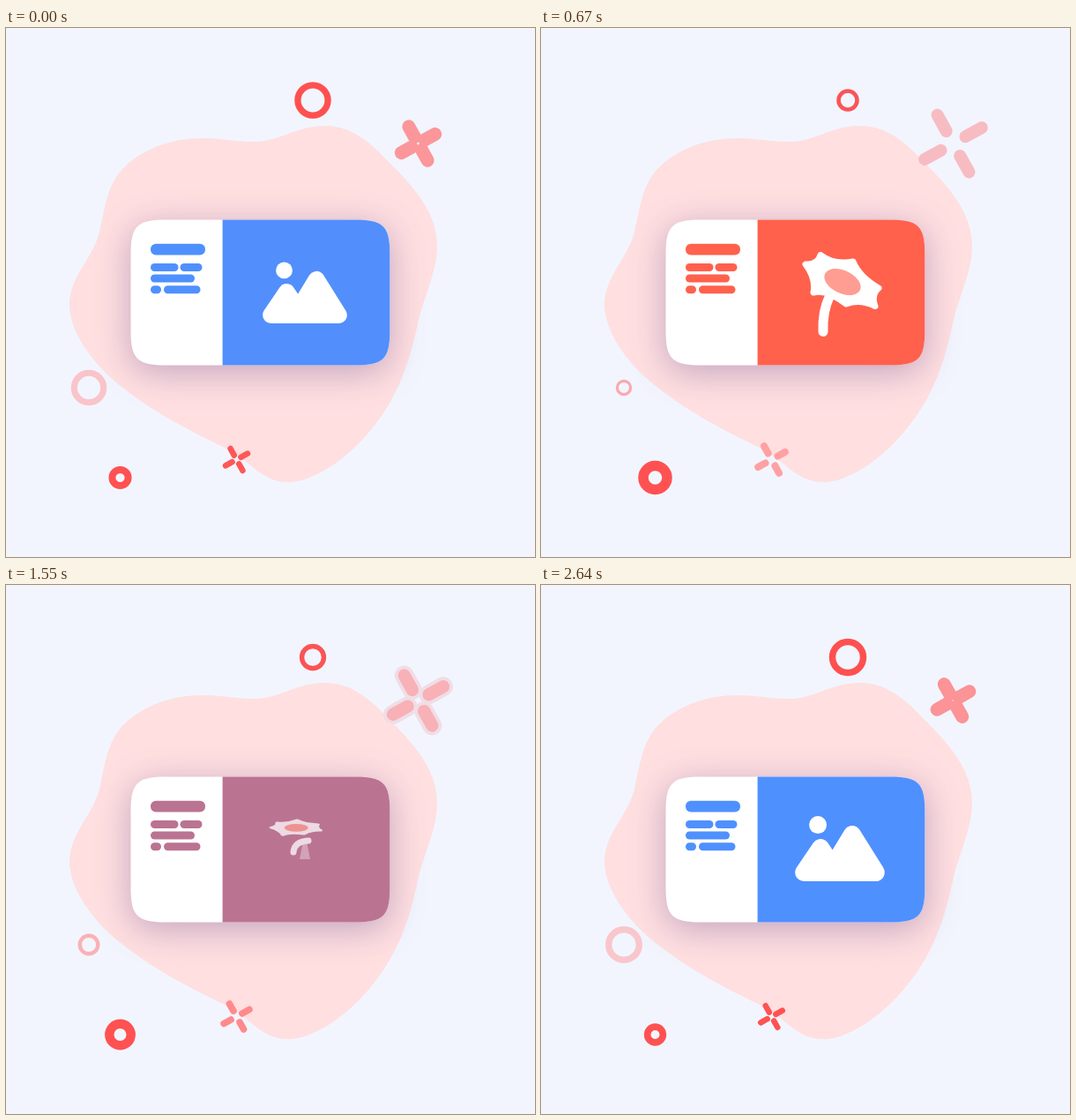
An HTML page for the animation above (2670 ms loop, 600 by 600 pixels).

```html
<!DOCTYPE html>
<html lang="en">
<head>
<meta charset="utf-8">
<title>Card morph</title>
<style>
html, body { margin: 0; width: 100%; height: 100%; overflow: hidden; background: #f2f5fd; }
svg { display: block; width: 100vw; height: 100vh; }
.shadow { filter: drop-shadow(0 8px 19px rgba(95, 70, 140, .38)); }
.round { stroke-linecap: round; stroke-linejoin: round; }
</style>
</head>
<body>
<svg viewBox="0 0 600 600">
  <defs>
    <clipPath id="clip"><use href="#cardShape"/></clipPath>
  </defs>
  <path fill="#ffdfe0" d="M360 111C390 110 412 128 434 152C466 183 489 212 489 247C489 278 473 305 466 340C455 390 440 425 412 458C388 487 350 515 320 515C290 515 278 492 250 477C205 455 165 435 125 402C95 377 72 342 72 314C72 282 98 262 106 232C112 205 114 180 132 160C155 136 190 125 222 125C245 125 260 129 282 129C310 129 330 111 360 111Z"/>

  <g class="shadow">
    <path id="cardShape" fill="#fff" d="M141.500 256C141.500 225 149 217.500 180 217.500H397C428 217.500 435.300 225 435.300 256V344C435.300 375 428 382.500 397 382.500H180C149 382.500 141.500 375 141.500 344Z"/>
  </g>
  <rect id="panel" x="245.600" y="216" width="191" height="168" clip-path="url(#clip)"/>

  <g id="text">
    <rect x="164" y="244.800" width="62" height="12.800" rx="6"/>
    <rect x="164" y="267" width="31.500" height="9" rx="4.500"/>
    <rect x="197.500" y="267" width="25" height="9" rx="4.500"/>
    <rect x="164" y="279.500" width="50" height="9" rx="4.500"/>
    <rect x="164" y="292.300" width="12" height="9" rx="4.500"/>
    <rect x="179" y="292.300" width="41.500" height="9" rx="4.500"/>
  </g>

  <g id="hills" class="round" fill="#fff">
    <circle cx="314" cy="272" r="10"/>
    <path stroke="#fff" stroke-width="20" d="M298 326L317 298L331 319L353 283L380 326Z"/>
  </g>

  <g id="flower" class="round">
    <path id="leaf" fill="#fff" d="M337 291H341L345 311H333Z"/>
    <path id="stem" fill="none" stroke="#fff"/>
    <g id="head">
      <path fill="#fff" stroke="#fff" stroke-width="7" d="M317 257.500Q332 269 354 265Q361 282 383 295Q374 303 379 315.500Q362 307 346 313Q324 296 309 300Q312 284 300 268Q314 269 317 257.500Z"/>
      <ellipse cx="342" cy="288" rx="22" ry="13" transform="rotate(25 342 288)" fill="#ff9d92"/>
    </g>
  </g>

  <g fill="none">
    <circle id="ringTop" cx="348" cy="82"/>
    <circle id="ringLeft" cx="94" cy="408"/>
    <circle id="ringLow" cx="129.500" cy="510"/>
    <g class="round">
      <path id="halo" stroke="#f1dce4" stroke-width="22"/>
      <path id="crossBig"/>
      <path id="crossSmall"/>
    </g>
  </g>
</svg>
<script>
const LOOP = 2670;
const $ = id => document.getElementById(id);
const set = (id, attrs) => {
  for (const k in attrs) $(id).setAttribute(k, attrs[k]);
};
const clamp = v => Math.max(0, Math.min(1, v));
const mix = (a, b, p) => a + (b - a) * p;
const tint = (a, b, p) => `rgb(${a.map((v, i) => Math.round(mix(v, b[i], p)))})`;

const BLUE = [79, 144, 255], RED = [255, 97, 77];

// time in ms, progress from hills (0) to flower (1)
const STEPS = [
  [0, .06], [120, .2], [300, .73], [420, .95], [550, 1], [1400, 1],
  [1480, .93], [1550, .73], [1610, .3], [1670, .04], [1780, .01], [2640, 0], [2670, .06]
];

function progress(t) {
  const i = Math.max(1, STEPS.findIndex(s => s[0] > t));
  const [t0, p0] = STEPS[i - 1], [t1, p1] = STEPS[i];
  return mix(p0, p1, (t - t0) / (t1 - t0));
}

function cross(cx, cy, near, far) {
  let d = '';
  for (let i = 0; i < 4; i++) {
    const a = (61 + 90 * i) * Math.PI / 180;
    const at = r => `${cx + r * Math.cos(a)} ${cy + r * Math.sin(a)}`;
    d += `M${at(near)}L${at(far)}`;
  }
  return d;
}

function ring(id, r, w, from, to, p) {
  set(id, {
    r: mix(r[0], r[1], p),
    'stroke-width': mix(w[0], w[1], p),
    stroke: tint(from, to, p)
  });
}

function drawFlower(p) {
  const k = clamp((p - .55) / .45);
  const bend = Math.min(1, (1 - k) / .6);
  const sx = .37 + .63 * k, sy = Math.max(0, 1.08 * k - .08);
  set('flower', { opacity: k ? Math.min(1, .5 + .625 * k) : 0 });
  set('leaf', { opacity: bend * .45 });
  set('head', {
    transform: `translate(${mix(342, 329, bend)} ${mix(287, 275, bend)}) ` +
      `scale(${sx} ${sy}) rotate(${-25 * bend}) translate(-342 -287)`
  });
  const at = (x0, y0, x1, y1) => `${mix(x0, x1, bend)} ${mix(y0, y1, bend)}`;
  set('stem', {
    d: `M${at(327, 305, 343, 290)}Q${at(319, 322, 327, 291)} ${at(320, 344.5, 326, 303)}`,
    'stroke-width': mix(11, 7, bend)
  });
}

function draw(t) {
  const p = progress(t);
  const hue = p ** 1.5;
  const textHue = t < 900 ? clamp((t - 310) / 90) : hue;
  set('panel', { fill: tint(BLUE, RED, hue) });
  set('text', { fill: tint(BLUE, RED, textHue) });
  set('hills', {
    transform: `translate(339 320) scale(${1 - p}) translate(-339 -320)`,
    opacity: clamp(1.4 - p * 2.6)
  });
  drawFlower(p);

  ring('ringTop', [17.5, 10.5], [7.5, 4.6], [255, 80, 80], [249, 85, 88], p);
  ring('ringLeft', [17.3, 7.6], [7.4, 3.2], [249, 198, 204], [250, 169, 174], p);
  ring('ringLow', [8.8, 13.5], [7.7, 11.5], [255, 81, 81], [255, 81, 81], p);

  const big = cross(467.5, 131, mix(8, 16, p), mix(21, 37, p));
  set('halo', { d: big, opacity: clamp(1 - Math.abs(p - .73) / .18) });
  set('crossBig', {
    d: big,
    'stroke-width': mix(15, 14, p),
    stroke: tint([251, 147, 151], [247, 188, 194], p)
  });
  set('crossSmall', {
    d: cross(261.5, 489.5, mix(5.5, 8, p), mix(14, 17.5, p)),
    'stroke-width': mix(6.5, 8, p),
    stroke: tint([255, 82, 82], [255, 160, 163], p)
  });
}

const start = performance.now();
function tick() {
  draw((performance.now() - start) % LOOP);
  requestAnimationFrame(tick);
}
tick();
</script>
</body>
</html>
```
